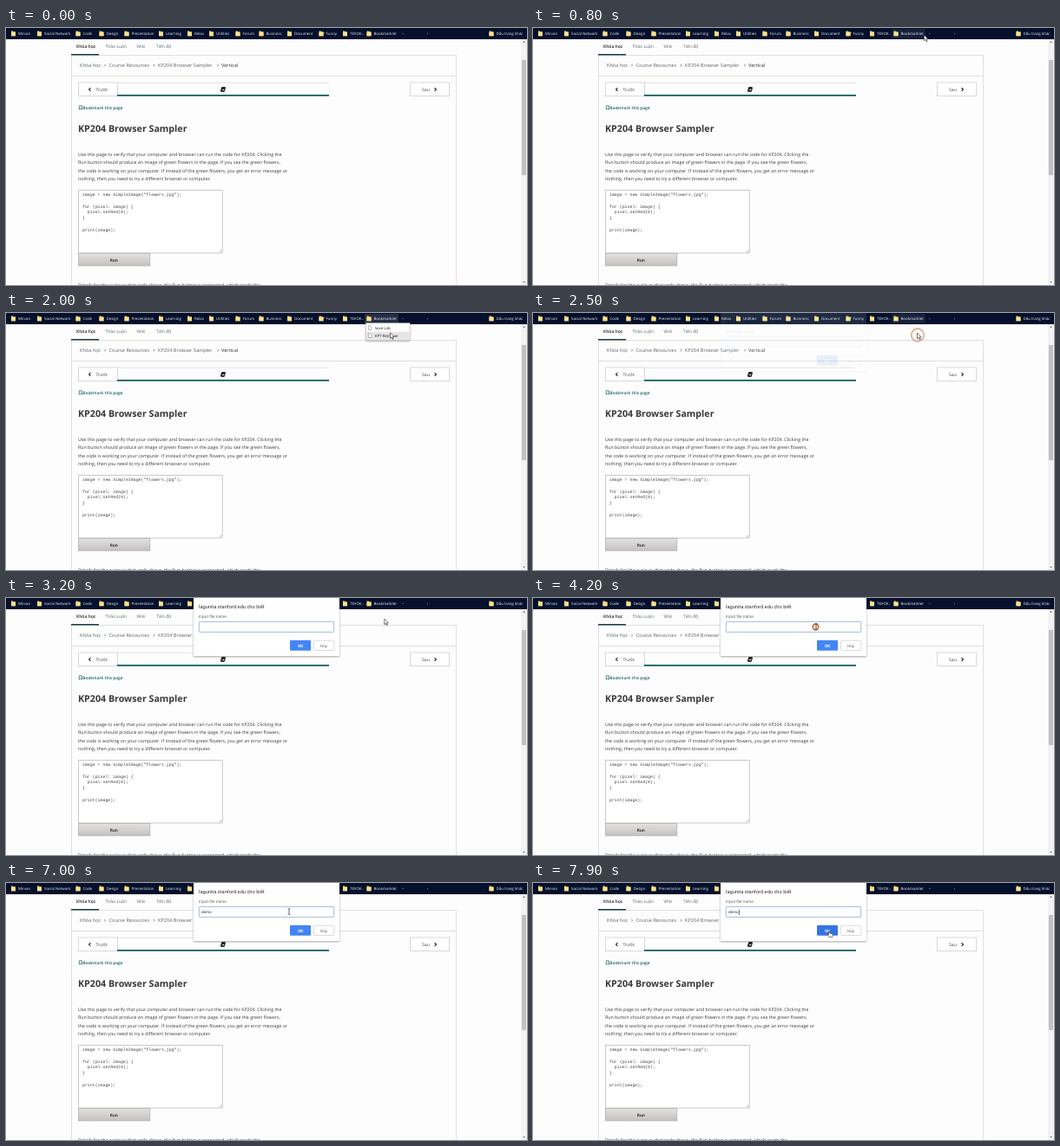
An HTML page for the animation above (8000 ms loop, 600x297 px).

```html
<!DOCTYPE html>
<html lang="vi">
<head>
<meta charset="utf-8">
<title>Bookmarklet demo</title>
<style>
html, body { margin: 0; width: 100%; height: 100%; overflow: hidden; background: #fdfdfd; }
svg { display: block; width: 600px; height: 297px; font-family: "Open Sans", "Noto Sans", sans-serif; }
text { white-space: pre; text-rendering: geometricPrecision; }
.ui { font-family: Roboto, sans-serif; }
.mono { font-family: "Liberation Mono", monospace; }
</style>
</head>
<body>
<svg id="stage" viewBox="0 0 600 297" xmlns="http://www.w3.org/2000/svg">
<defs>
  <linearGradient id="btn" x2="0" y2="1"><stop stop-color="#e4e2e1"/><stop offset="1" stop-color="#c4c0c0"/></linearGradient>
  <filter id="shadow" x="-10%" y="-20%" width="120%" height="150%"><feDropShadow dx="0" dy="1" stdDeviation="1.3" flood-opacity=".35"/></filter>
</defs>
<g id="page"></g>
<g id="bar"></g>
<g id="menu" filter="url(#shadow)"></g>
<g id="dialog"></g>
<circle id="ring" fill="#f6d9bd" stroke="#c8703a" stroke-width="1.6"/>
<path id="arrow" d="M0 0V6.6L1.6 5.2L2.7 7.8L3.8 7.3L2.7 4.8H4.7Z" fill="#fff" stroke="#222" stroke-width=".6"/>
<path id="beam" d="M-1.5 -3.3H-.4L0 -2.9L.4 -3.3H1.5M0 -2.9V2.9M-1.5 3.3H-.4L0 2.9L.4 3.3H1.5" fill="none" stroke="#333" stroke-width=".75"/>
<path id="hand" d="M0 .6Q.7 -.4 1.3 .6V3L4.2 3.7Q5 4.1 4.7 5.2L4.1 7.6H.8L-1.2 4.8Q-1.2 4 0 4.5Z" fill="#fff" stroke="#222" stroke-width=".6"/>
</svg>
<script>
const $ = id => document.getElementById(id);
const text = (x, y, size, fill, str, extra = '') =>
  `<text x="${x}" y="${y}" font-size="${size}" fill="${fill}" ${extra}>${str}</text>`;
const rect = (x, y, w, h, fill, extra = '') =>
  `<rect x="${x}" y="${y}" width="${w}" height="${h}" fill="${fill}" ${extra}/>`;
const path = (d, stroke, width = 1, fill = 'none') =>
  `<path d="${d}" stroke="${stroke}" stroke-width="${width}" fill="${fill}"/>`;
const border = c => `stroke="${c}" stroke-width=".8"`;
const chevron = (x, y, dir, c, s = 1.5) => path(`M${x - dir * s / 2} ${y - s}l${dir * s} ${s}l${-dir * s} ${s}`, c, s / 1.7);

const TEAL = '#12625d', INK = '#3c3c3c', SOFT = '#5c6670', LINE = '#d9d9d9';
const SEMI = 'font-weight="600"', BOLD = 'font-weight="700"', MID = 'text-anchor="middle"';
const COURSE = 'KP204 Browser Sampler';

function drawPage() {
  const tabs = [[81, 'Khóa học'], [114.5, 'Thảo Luận'], [150.5, 'Wiki'], [173, 'Tiến độ']];
  const crumbs = [[85, 'Khóa học'], [118.5, 'Course Resources'], [175, COURSE], [248, 'Vertical']];
  const intro = [
    'Use this page to verify that your computer and browser can run the code for KP204. Clicking the',
    'Run button should produce an image of green flowers in the page. If you see the green flowers,',
    'the code is working on your computer. If instead of the green flowers, you get an error message or',
    'nothing, then you need to try a different browser or computer.'
  ];
  const code = ['image = new SimpleImage("flowers.jpg");', '', 'for (pixel: image) {',
    '  pixel.setRed(0);', '}', '', 'print(image);'];
  return [
    path('M75.5 297V31.5H518.5V297M75.5 55.5H518.5', LINE, .8),
    rect(75, 30, 32, 1.5, '#163f45'),
    ...tabs.map(([x, s], i) => text(x, 23, 5, i ? SOFT : '#222', s, i ? '' : SEMI)),
    ...crumbs.map(([x, s], i) => text(x, 45.2, 5.6, i < 3 ? SOFT : '#333', s)),
    ...[114, 170.5, 244].map(x => chevron(x, 43.2, 1, '#666', 1.3)),
    path('M128 63.3H372', '#dcdcdc', .8),
    rect(83.4, 63, 45, 15.7, '#fff', border('#cfcfcf')),
    rect(465.6, 63, 45, 15.7, '#fff', border('#cfcfcf')),
    rect(128, 77, 244, 1.8, TEAL),
    chevron(96.5, 71, -1, '#222', 1.9), text(103.5, 73, 5.1, '#444', 'Trước'),
    text(479, 73, 5.1, '#444', 'Sau'), chevron(494.5, 71, 1, '#222', 1.9),
    path('M248.6 68.5H252.4L251.2 72.4H247.4ZM247.4 72.4Q247 73.4 248 73.4H251.3L252.5 69.5', '#111', .7, '#111'),
    path('M84.3 89.8H87.3V94.3L85.8 93L84.3 94.3Z', TEAL, .7),
    text(88.3, 94, 4.8, TEAL, 'Bookmark this page', SEMI),
    text(83, 120, 10.7, '#393939', COURSE, BOLD),
    ...intro.map((s, i) => text(83, 148 + i * 9.45, 5.28, INK, s)),
    rect(83.4, 187.4, 165.8, 72.6, '#fff', border('#bcbcbc')),
    ...code.map((s, i) => text(88, 194 + i * 6.75, 4.9, '#444', s, 'class="mono"')),
    path('M245.5 259l3 -3M247.2 259l1.3 -1.3', '#888', .5),
    rect(83.4, 260.6, 82.4, 14.2, 'url(#btn)', border('#b5b2b2')),
    text(124.3, 269.5, 4.7, '#333', 'Run', `${BOLD} ${MID}`),
    text(83, 299.2, 5.28, INK, 'Details for the curious: that code above, the Run button is connected, which reads the'),
    rect(593, 12, 7, 285, '#f2f2f2'),
    rect(594, 37, 5, 133, '#c1c1c1'),
    path('M595.2 16.7l1.4 -1.6l1.4 1.6ZM595.2 293l1.4 1.6l1.4 -1.6Z', 'none', 0, '#666')
  ].join('');
}

function drawBar() {
  const marks = [[14, 'Mirvan'], [44, 'Social Network'], [88.5, 'Code'], [115.5, 'Design'],
    [144.5, 'Presentation'], [184, 'Learning'], [217, 'Relax'], [242, 'Utilities'], [272.5, 'Forum'],
    [299.5, 'Business'], [332, 'Document'], [368.5, 'Funny'], [396, 'TEVOK'], [423.5, 'Bookmarklet'],
    [564.5, 'Dấu trang khác']];
  const folder = x => path(`M${x} 3.4h2l.6 .8h2.4v5h-5Z`, 'none', 0, '#f5d264') + rect(x, 5, 5, 4.2, '#fbe08c');
  const stars = [[366.5, 5.6], [411, 7], [457, 6.4], [485.5, 6.6]];
  return rect(0, 0, 600, 13, '#04102c')
    + rect(413, 1, 39, 11, '#fff', 'id="hover" opacity="0"')
    + stars.map(([x, y]) => `<circle cx="${x}" cy="${y}" r=".6" fill="#8c9a92"/>`).join('')
    + marks.map(([x, s]) => folder(x - 8) + text(x, 7.8, 4.4, '#f0f2f5', s)).join('');
}

function drawMenu() {
  const row = (y, s) => path(`M417.4 ${y - 2.4}h2.2l1.2 1.2v3.7h-3.4Z`, '#777', .5, '#fff') + text(424.7, y + 1.7, 4.4, '#222', s);
  return rect(414.5, 11.7, 50.5, 19.6, '#fff', 'stroke="#bbb" stroke-width=".5"')
    + rect(415, 21.8, 49.5, 9, '#e6e6e6', 'id="pick"')
    + row(17, 'Save Lab') + row(26, 'KPT Retriever');
}

function drawDialog() {
  return rect(216, -4, 168, 71, '#fff', 'filter="url(#shadow)"')
    + '<g class="ui">'
    + text(222, 12.4, 5.7, '#333', 'lagunita.stanford.edu cho biết')
    + text(222, 22.6, 4.85, '#6a6a6a', 'Input file name')
    + rect(222.3, 27.4, 155.4, 12, '#fff', `rx=".8" ${border('#8fabd0')}`)
    + text(225, 35.2, 4.6, '#333', '', 'id="typed"')
    + rect(225, 30.5, .6, 6.5, '#222', 'id="caret"')
    + rect(327, 48.8, 24, 12, '#4285f4', 'id="ok" rx="1"')
    + text(339, 56.6, 4.7, '#fff', 'OK', `${MID} ${BOLD}`)
    + rect(354.4, 49.2, 23.4, 11.3, '#fff', `rx="1" ${border('#d2d2d2')}`)
    + text(366, 56.6, 4.7, '#666', 'Hủy', MID)
    + '</g>';
}

$('page').innerHTML = drawPage();
$('bar').innerHTML = drawBar();
$('menu').innerHTML = drawMenu();
$('dialog').innerHTML = drawDialog();

const LOOP = 8000, STEP = 100;
// Pointer stops: time, x, y
const moves = [[200, 584, -8], [900, 442.5, 9], [1600, 442.5, 9], [2000, 442.5, 22.8],
  [3140, 442.5, 23.5], [3550, 326, 33], [7300, 326, 33], [7900, 340.5, 55]];
// Clicks: time, x, y
const clicks = [[1050, 443, 12], [2100, 443, 25.5], [4100, 325.5, 33.5]];
const keys = [[5300, 'd'], [5500, 'de'], [6300, 'dem'], [6500, 'demo']];
const caretOn = [[3500, 4000], [4600, 5100], [5300, 6100], [6300, 7000], [7500, 8000]];

const ramp = (t, a, b) => Math.min(1, Math.max(0, (t - a) / (b - a)));
const ease = p => p * p * (3 - 2 * p);
const during = (t, a, b) => t >= a && t < b;
const show = (id, o) => $(id).setAttribute('opacity', o);
const last = (list, t) => list.filter(e => e[0] <= t).pop();

function pointerAt(t) {
  const from = last(moves, t) || moves[0];
  const to = moves[moves.indexOf(from) + 1] || from;
  const p = to === from ? 0 : ease(ramp(t, from[0], to[0]));
  return [from[1] + (to[1] - from[1]) * p, from[2] + (to[2] - from[2]) * p];
}

function drawRing(t) {
  const [start, x, y] = last(clicks, t) || clicks[0];
  const p = ramp(t, start, start + 600), ring = $('ring');
  show('ring', p > 0 ? 1 - p * p : 0);
  ring.setAttribute('cx', x);
  ring.setAttribute('cy', y);
  ring.setAttribute('r', 2 + p * 8);
  ring.setAttribute('fill-opacity', .7 * (1 - p));
}

function render(t) {
  const [x, y] = pointerAt(t);
  const inField = during(t, 3500, 7500), onButton = t >= 7700;
  const shape = inField ? 'beam' : onButton ? 'hand' : 'arrow';
  for (const id of ['arrow', 'beam', 'hand']) show(id, +(id === shape));
  $(shape).setAttribute('transform', `translate(${x} ${y})`);

  show('hover', .13 * ramp(t, 700, 900) * (1 - ramp(t, 2200, 2900)));
  show('menu', ramp(t, 1100, 1400) * (1 - ramp(t, 2200, 2500)));
  show('pick', ramp(t, 1800, 1900));
  show('dialog', ease(ramp(t, 2400, 2900)));
  $('ok').setAttribute('fill', onButton ? '#3574e2' : '#4285f4');
  drawRing(t);

  const typed = $('typed');
  typed.textContent = (last(keys, t) || [0, ''])[1];
  $('caret').setAttribute('x', 225.3 + typed.getComputedTextLength());
  show('caret', +caretOn.some(([a, b]) => during(t, a, b)));
}

const start = performance.now();
function tick() {
  const t = (performance.now() - start) % LOOP;
  render(Math.floor(t / STEP) * STEP);
  requestAnimationFrame(tick);
}
tick();
</script>
</body>
</html>
```
